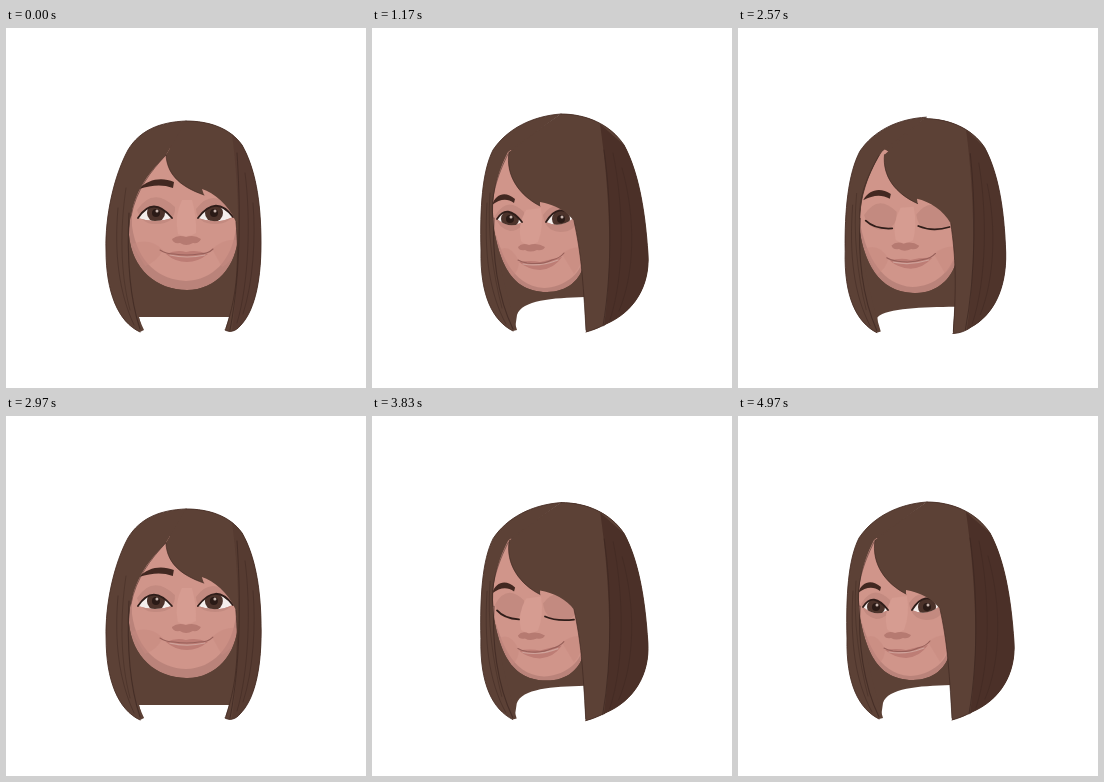
Animation of 360 by 360 pixels, one loop 5000 ms. Source, as an HTML page:

```html
<!DOCTYPE html>
<html lang="en">
<head>
<meta charset="utf-8">
<title>Turning head</title>
<style>
html, body { margin: 0; width: 100%; height: 100%; overflow: hidden; background: #fff; }
svg { display: block; width: 100vw; height: 100vh; }
path { stroke-linecap: round; stroke-linejoin: round; }
</style>
</head>
<body>
<svg viewBox="0 0 360 360">
  <defs>
    <clipPath id="faceClip"><path id="faceClipPath"/></clipPath>
    <clipPath id="leftClip"><path id="leftClipPath"/></clipPath>
    <clipPath id="rightClip"><path id="rightClipPath"/></clipPath>
  </defs>
  <g id="head">
    <g id="back"></g>
    <g id="face" clip-path="url(#faceClip)"></g>
    <g id="leftEye" clip-path="url(#leftClip)"></g>
    <g id="rightEye" clip-path="url(#rightClip)"></g>
    <g id="lashes"></g>
    <g id="hair"></g>
  </g>
</svg>
<script>
const LOOP = 5000;
const HAIR = '#5c4136', DARK = '#4a3028', LINE = '#3d2721';
const $ = id => document.getElementById(id);
const NUMBER = /-?[\d.]+/g;

// Blend two paths that share the same commands.
function mix(a, b, k) {
  const ends = b.match(NUMBER);
  let i = 0;
  return a.replace(NUMBER, v => (+v + (ends[i++] - v) * k).toFixed(2));
}
const clamp = x => Math.min(1, Math.max(0, x));
const smooth = (t, from, to) => {
  const x = clamp((t - from) / (to - from));
  return x * x * (3 - 2 * x);
};
const bump = (t, from, to) => Math.sin(Math.PI * clamp((t - from) / (to - from))) ** 2;
const blink = (t, from, to) => smooth(t, from, from + 110) - smooth(t, to - 120, to);

const parts = [];
function add(layer, front, turned, attrs, extra = {}) {
  const el = document.createElementNS('http://www.w3.org/2000/svg', 'path');
  for (const [key, value] of Object.entries({ fill: 'none', ...attrs })) el.setAttribute(key, value);
  $(layer).append(el);
  parts.push({ el, front, turned, ...extra });
  return el;
}
const stroke = (color, width, opacity = 1) =>
  ({ stroke: color, 'stroke-width': width, 'stroke-opacity': opacity });

// Outer silhouette, split so that the locks can share its edges.
const leftEdge = [
  'C112 294 100 264 100 222 C99 188 108 148 122 122 C134 102 154 94 180 93',
  'C121 293 108 268 109 222 C108 180 110 144 121 122 C135 101 160 88 189 86'];
const rightSide = [
  'C247 285 255 258 255 215 C255 172 249 140 236 117',
  'C262 284 278 258 276 226 C273 180 266 143 252 117'];
const rightEdge = [
  `C224 305 230 303 234 298 ${rightSide[0]} C224 100 203 93 180 93`,
  `C222 302 228 299 234 296 ${rightSide[1]} C238 96 214 86 189 86`];

add('back',
  `M136 301 L133 289 C150 289 195 289 225 289 L219 302 ${rightEdge[0]} L124 130 C112 170 108 240 134 301Z`,
  `M143 301 L145 287 C150 272 180 270 213 269 L214 304 ${rightEdge[1]} L124 130 C118 170 114 240 141 301Z`,
  { fill: HAIR });

const face = [
  'M160 118 C140 140 123 170 123 207 C126 241 150 262 181 262 C210 262 231 238 232 207 C232 180 225 150 205 140Z',
  'M136 120 C124 144 119 170 121 198 C127 225 134 264 175 264 C195 264 209 252 212 235 C214 205 206 170 180 150Z'];
add('face', ...face, { fill: '#ba837a' });
add('face',
  'M160 118 C132 142 125 170 126 198 C131 235 154 252 180 253 C207 252 226 232 230 200 C229 180 225 150 205 140Z',
  'M136 120 C122 144 119 170 121 198 C129 222 138 258 172 260 C191 259 208 248 212 229 C213 205 206 170 180 150Z',
  { fill: '#d0958a' });
// Eye sockets
const SOCKET = { fill: '#bf877d', 'fill-opacity': .75 };
add('face', 'M131 182 Q147 158 169 179 Q170 196 150 196 Q136 197 131 182Z',
  'M123 188 Q135 167 152 184 Q153 203 138 203 Q126 200 123 188Z', SOCKET);
add('face', 'M190 181 Q207 158 229 183 Q225 196 209 196 Q191 196 190 181Z',
  'M171 187 Q185 167 206 190 Q204 204 188 204 Q173 203 171 187Z', SOCKET);
// Cheeks, nose and mouth
const CHEEK = { fill: '#c78a80', 'fill-opacity': .5 };
add('face', 'M126 216 Q144 209 157 222 Q151 234 139 238', 'M127 222 Q138 215 147 233 Q147 243 140 249', CHEEK);
add('face', 'M206 221 Q218 210 232 212 Q229 232 216 239', 'M190 226 Q200 217 212 220 Q210 238 202 246', CHEEK);
add('face', 'M176 172 Q168 188 172 206 Q181 211 190 205 Q191 190 186 172Z',
  'M154 182 Q145 198 149 213 Q156 220 166 214 Q172 199 169 180Z',
  { fill: '#d69c91' });
add('face', 'M166 211 Q172 206 180 209 Q188 206 195 211 Q193 216 187 215 Q180 219 174 215 Q167 216 166 211Z',
  'M146 219 Q150 214 157 217 Q165 214 173 219 Q171 223 165 222 Q158 225 153 222 Q147 223 146 219Z',
  { fill: '#b67a71' });
add('face', 'M160 226 Q171 221 180 224 Q190 221 202 226 Q192 234 181 234 Q169 234 160 226Z',
  'M147 234 Q159 232 168 234 Q179 231 190 229 Q182 241 168 242 Q155 241 147 234Z',
  { fill: '#bd7d75' });
add('face', 'M164 227 Q181 231 199 227', 'M151 236 Q168 239 186 232', stroke('#cfa39b', 1.2));
add('face', 'M154 222 Q160 226 168 226 Q181 228 193 226 Q202 226 207 221',
  'M146 232 Q149 234 155 235 Q170 237 180 232 Q188 230 192 225', stroke('#98605a', 1.1));

// Eyes: upper lids travel down to the lower lids while blinking.
function eye(side, iris, upper, lower, shutUpper, shutLower) {
  const shape = [0, 1].map(i => `${upper[i]} ${lower[i]}Z`);
  const shut = [0, 1].map(i => `${shutUpper[i]} ${shutLower[i]}Z`);
  add(side + 'Eye', ...shape, { fill: '#f4eeec' }, { shut });
  add(side + 'Eye', ...iris, stroke('#4c332b', 18));
  add(side + 'Eye', ...iris, stroke('#2a1a16', 8));
  add(side + 'Eye', ...iris, { ...stroke('#c8b5ae', 3), transform: 'translate(1 -2)' });
  parts.push({ el: $(side + 'ClipPath'), front: shape[0], turned: shape[1], shut });
  add('lashes', ...upper, stroke('#2f1d19', 1.8), { shut: shutUpper });
}
eye('left', ['M150 185h.01', 'M138 191h.01'],
  ['M132 190 Q147 167 166 190', 'M125 191 Q135 175 150 194'],
  ['Q149 196 132 190', 'Q138 202 125 191'],
  ['M132 187 Q145 197 166 192', 'M125 194 Q132 202 147 203'],
  ['Q145 197 132 187', 'Q132 202 125 194']);
eye('right', ['M208 185h.01', 'M189 191h.01'],
  ['M192 190 Q210 166 227 189', 'M174 194 Q187 173 202 190'],
  ['Q211 197 192 190', 'Q188 201 174 194'],
  ['M192 190 Q212 198 227 187', 'M173 200 Q184 205 202 203'],
  ['Q212 198 192 190', 'Q184 206 173 200']);

const brow = add('lashes',
  'M134 161 C143 151 157 149 169 154 L168 160 C157 156 147 157 134 161Z',
  'M121 177 C125 165 135 163 144 171 L143 175 C136 170 129 171 121 177Z',
  { fill: '#422821' });

// Front locks; the far edge settles sooner than the rest of the head.
const EARLY = { early: true };
add('hair',
  `M160 127 C143 145 124 165 122 210 C122 250 126 275 138 302 L134 304 ${leftEdge[0]}Z`,
  `M136 124 C123 150 118 172 123 207 C127 235 134 264 145 302 L141 303 ${leftEdge[1]}Z`,
  { fill: HAIR }, EARLY);
add('hair',
  `M160 127 C161 145 172 158 198 167 L196 161 C208 165 222 176 230 194 C233 230 232 265 219 302 ${rightEdge[0]}Z`,
  `M137 124 C133 148 148 168 168 178 L168 174 C181 176 195 183 202 193 C209 225 211 250 214 304 ${rightEdge[1]}Z`,
  { fill: HAIR });
const shade = add('hair',
  `M226 106 C234 165 235 240 226 303 L234 298 ${rightSide[0]}Z`,
  `M228 96 C238 165 241 240 232 298 L234 296 ${rightSide[1]}Z`,
  { fill: DARK });

// Fine strands
const strands = [
  ['M123 185 C121 225 122 265 134 301', 'M122 190 C120 225 125 268 141 301', 1.1, EARLY],
  ['M112 180 C108 225 113 265 128 297', 'M115 175 C112 225 117 265 134 296', .7, EARLY],
  ['M120 160 C114 200 114 245 124 282', 'M118 165 C115 205 121 245 130 280', .6, EARLY],
  ['M160 127 C145 143 130 162 125 188', 'M136 126 C125 148 118 170 121 190', .8, EARLY],
  ['M231 125 C234 170 236 240 224 302', 'M232 122 C239 170 241 240 231 298', 1],
  ['M239 145 C245 190 243 255 231 295', 'M241 125 C252 180 253 245 238 292', .7],
  ['M247 175 C250 210 247 255 237 286', 'M250 140 C264 190 263 245 247 283', .7],
  ['M230 194 C233 230 232 265 220 300', 'M202 193 C209 225 211 250 214 302', .9],
  ['M160 127 C161 145 172 158 198 167', 'M137 124 C133 148 148 168 168 178', .9],
];
for (const [front, turned, width, extra] of strands) add('hair', front, turned, stroke(LINE, width, .7), extra);
add('hair', `M134 304 ${leftEdge[0]}`, `M141 303 ${leftEdge[1]}`, stroke(DARK, .9), EARLY);
add('hair', `M219 302 ${rightEdge[0]}`, `M214 304 ${rightEdge[1]}`, stroke(DARK, .9));
parts.push({ el: $('faceClipPath'), front: face[0], turned: face[1] });

function draw(t) {
  const turn = smooth(t, 265, 1015) - smooth(t, 2255, 3005) + smooth(t, 3310, 3840);
  const nod = 8 * bump(t, 400, 900) + 2 * bump(t, 2400, 2800) + 8 * bump(t, 3420, 3870);
  const rise = 2.5 * bump(t, 130, 430);
  const closed = blink(t, 450, 780) + blink(t, 2420, 2740) + blink(t, 3620, 3960);
  const lift = bump(t, 3120, 3640);

  for (const { el, front, turned, shut, early } of parts) {
    let d = mix(front, turned, early ? Math.sin(turn * Math.PI / 2) : turn);
    if (shut) d = mix(d, mix(shut[0], shut[1], turn), closed);
    el.setAttribute('d', d);
  }
  for (const side of ['left', 'right']) $(side + 'Eye').style.opacity = clamp((1 - closed) * 6);
  shade.setAttribute('fill-opacity', .35 + .6 * turn);
  brow.setAttribute('transform', `translate(-1 ${-3 * lift})`);
  $('head').setAttribute('transform', `translate(0 ${nod - rise}) rotate(${.28 * nod} 185 195)`);
}

const start = performance.now();
function tick() {
  draw((performance.now() - start) % LOOP);
  requestAnimationFrame(tick);
}
tick();
</script>
</body>
</html>
```
